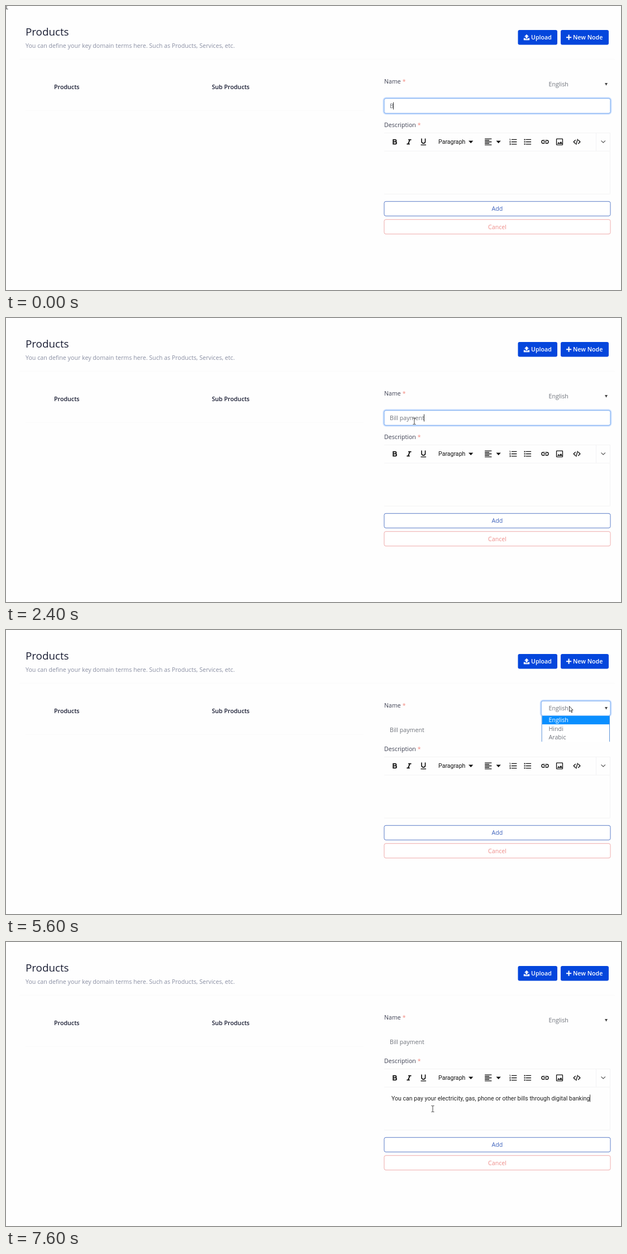
An HTML page that plays this animation: 1101x509 px, repeating every 8000 ms.

```html
<!DOCTYPE html>
<html lang="en">
<head>
<meta charset="utf-8">
<title>Products</title>
<style>
html, body { margin: 0; width: 100%; height: 100%; overflow: hidden; background: #fefefe; }
svg { display: block; width: 100%; height: 100%; }
text { font: 10.66px "Open Sans", sans-serif; fill: #3f4254; white-space: pre; }
.title { font-size: 18.8px; font-weight: 500; fill: #181c32; }
.sub { fill: #8a8fa3; }
.head { font-weight: 600; fill: #181c32; }
.btn { font-weight: 600; fill: #fff; }
.mid { text-anchor: middle; }
.star { fill: #f28b82; }
.field { fill: #6f737b; }
.rte { font: 10.6px Roboto, sans-serif; fill: #222; }
.tip { font-size: 8.5px; fill: #fff; text-anchor: middle; }
.faint { stroke: #f3f3f4; fill: none; }
.ring { fill: none; stroke: #cfe2ff; stroke-width: 4; }
.focus { fill: #fff; stroke: #6fa4ee; }
.ico { fill: none; stroke: #111; stroke-width: 2; }
.ico .fill { fill: #111; stroke: none; }
</style>
</head>
<body>
<svg viewBox="0 0 1101 509">
  <rect width="1101" height="509" fill="#fefefe"/>
  <path class="faint" d="M24 95.5H1090M35 187.5H640" style="stroke:#fafafa"/>

  <text class="title" x="35" y="52.5">Products</text>
  <text class="sub" x="35" y="74.7">You can define your key domain terms here. Such as Products, Services, etc.</text>
  <g fill="#0446dc">
    <rect x="916.5" y="43" width="70.5" height="26.5" rx="3"/>
    <rect x="993" y="43" width="86" height="26.5" rx="3"/>
  </g>
  <path fill="#fff" d="M932 50.8l4 4.2h-2.5v3.3h-3V55H928zM926.8 57.5h2.8v1.7h4.8v-1.7h2.8v3.7h-10.4z"/>
  <path stroke="#fff" stroke-width="2.1" d="M1003 56.2h9.2M1007.6 51.6v9.2"/>
  <text class="btn" x="940" y="60">Upload</text>
  <text class="btn" x="1015" y="60">New Node</text>

  <text class="head" x="86" y="148.5">Products</text>
  <text class="head" x="368.5" y="148.5">Sub Products</text>

  <text x="677" y="139.3">Name <tspan class="star">*</tspan></text>
  <text x="677" y="216.5">Description <tspan class="star">*</tspan></text>

  <g id="nameFocus">
    <rect class="ring" x="676.5" y="165.2" width="406" height="27.6" rx="4"/>
    <rect class="focus" x="677" y="165.7" width="405" height="26.6" rx="3"/>
  </g>
  <text class="field" id="name" x="687" y="183.4"></text>

  <g id="langFocus">
    <rect class="ring" x="957.7" y="126.7" width="124.8" height="27.2" rx="4"/>
    <rect class="focus" x="958.2" y="127.2" width="123.8" height="26.2" rx="3"/>
  </g>
  <text class="field" x="971.5" y="144.4">English</text>
  <path fill="#444" d="M1072 138h5l-2.500 4.800z"/>

  <path class="faint" d="M677 227.500H1081.500V337H677M677 260H1081M1056.500 228V260"/>
  <g id="tools"></g>
  <text class="rte" x="774" y="246.700" style="fill:#111">Paragraph</text>
  <path fill="#111" d="M828 241.500h8.400l-4.200 4.400zM877.500 241.500h8.400l-4.200 4.400z"/>
  <path fill="none" stroke="#555" stroke-width="1.200" d="M1065.500 241.300l3.700 3.700 3.700-3.700"/>
  <text class="rte" id="desc" x="690" y="283.800"></text>

  <rect x="677" y="350.300" width="405" height="26" rx="3" fill="#fff" stroke="#5a7cc8"/>
  <text class="mid" x="879.500" y="367" style="fill:#3f63bd">Add</text>
  <rect x="677" y="382.700" width="405" height="26" rx="3" fill="#fff" stroke="#eeaaaa"/>
  <text class="mid" x="879.500" y="399.800" style="fill:#ee8c88">Cancel</text>

  <g id="list">
    <rect x="959" y="153.500" width="122" height="46.700" fill="#fff"/>
    <path stroke="#5d93d8" d="M959.200 153.500V200.200M1080.500 153.500V200.200"/>
    <rect x="960" y="153.800" width="120.200" height="15.300" fill="#0a8fff"/>
    <text x="971.500" y="165.300" style="fill:#fff">English</text>
    <text class="field" x="971.500" y="180.600">Hindi</text>
    <text class="field" x="971.500" y="195.900">Arabic</text>
  </g>

  <g id="tip">
    <path fill="#29364b" d="M903 132H934L961 144Z"/>
    <rect x="843" y="100.500" width="107" height="33.300" rx="5.500" fill="#29364b"/>
    <text class="tip" x="896.500" y="120.500">Select language</text>
  </g>

  <path id="caret" stroke="#333" d="M0 0V13"/>
  <path id="beam" fill="none" stroke="#444" d="M-2.500 -5.500H-.8L0 -4.800L.8 -5.500H2.500M0 -5V5M-2.500 5.500H-.8L0 4.800L.8 5.500H2.500"/>
  <path id="arrow" fill="#fff" stroke="#222" stroke-width=".9" d="M0 0V9.500L2.200 7.500L3.800 11.200L5.300 10.500L3.700 7H6.600Z"/>
</svg>
<script>
const $ = id => document.getElementById(id);
const LOOP = 8000, STEP = 200;

// Toolbar icons on a 24-unit grid, placed by their centre
const tools = [
  [695.7, '<path stroke-width="2.700" d="M8.400 5.300h5a2.700 2.700 0 0 1 0 5.500h-5h5.600a2.950 2.950 0 0 1 0 5.900h-5.600z"/>', 1],
  [721.5, '<path stroke-width="2.700" d="M10 5.400h8M6 16.600h8M14.200 5.400l-4.500 11.200"/>', 1],
  [747.3, '<path stroke-width="2.400" d="M7.200 3v8a4.800 4.800 0 0 0 9.600 0V3"/><path d="M5 20h14"/>'],
  [863.3, '<path d="M3 4h18M3 8h12M3 12h18M3 16h12M3 20h18"/>'],
  [908.3, '<path d="M7 6h14M7 12h14M7 18h14"/><path stroke-width="1.200" d="M2 4.500h1.500V8M2 10.500h2.500L2.300 13.500H5M2 16.500h2.500v3H2M3 18h1.500"/>'],
  [934, '<path d="M7 6h14M7 12h14M7 18h14"/><path stroke-width="3" d="M2.500 6h3M2.500 12h3M2.500 18h3"/>'],
  [965, '<path d="M11 8H7a4 4 0 0 0 0 8h4M13 8h4a4 4 0 0 1 0 8h-4M8 12h8"/>'],
  [991, '<rect x="4" y="4" width="16" height="16" rx="1"/><path class="fill" d="M6 17l3.500-4.500 2.500 3 3.500-4.500 4 6z"/>'],
  [1022, '<path d="M8.700 6.700L3.400 12l5.300 5.300M15.300 6.700l5.300 5.300-5.300 5.300M14 4.500l-4 15"/>']
];
$('tools').innerHTML = tools.map(([x, body, dy = 0]) =>
  `<g class="ico" transform="translate(${x} 243.500) scale(.68) translate(-12 ${dy - 12})">${body}</g>`).join('');

const pointer = [
  [0, 1, 0], [200, 90, 20], [1200, 714, 203], [1400, 714, 203], [1600, 718, 206],
  [1800, 718, 206], [2000, 731, 185], [2800, 731, 185], [3400, 850.5, 149],
  [4000, 1012, 148], [4400, 1015, 145.5], [4800, 1008.5, 135.5],
  [5800, 1008.5, 137], [6000, 1000, 160], [6400, 764, 299]
];
const nameTyped = [[0, 1], [1600, 4], [2000, 7], [2200, 10], [2400, 12]];
const descTyped = [[0, 0], [6600, 8], [7000, 35], [7400, 61], [7600, 79]];
const NAME = 'Bill payment';
const DESC = 'You can pay your electricity, gas, phone or other bills through digital banking';

const last = (keys, t) => keys.filter(k => k[0] <= t).pop();
const within = (t, a, b) => t >= a && t < b;
const show = (id, on) => $(id).setAttribute('visibility', on ? 'visible' : 'hidden');
const move = (id, x, y) => $(id).setAttribute('transform', `translate(${x} ${y})`);

function pointAt(t) {
  const a = last(pointer, t);
  const b = pointer[pointer.indexOf(a) + 1] || a;
  const k = a === b ? 0 : (t - a[0]) / (b[0] - a[0]);
  return [a[1] + (b[1] - a[1]) * k, a[2] + (b[2] - a[2]) * k];
}

function draw(time) {
  const t = Math.floor((time % LOOP) / STEP) * STEP;
  $('name').textContent = NAME.slice(0, last(nameTyped, t)[1]);
  $('desc').textContent = DESC.slice(0, last(descTyped, t)[1]);

  show('nameFocus', t < 5600);
  show('langFocus', within(t, 5600, 6600));
  show('list', within(t, 5600, 6000));
  show('tip', within(t, 3000, 4200));

  const editing = t >= 6400;
  const box = $(editing ? 'desc' : 'name');
  const x = (editing ? 690 : 687) + box.getComputedTextLength();
  move('caret', Math.floor(x) + .5, editing ? 273.5 : 172.5);
  show('caret', t < 4200 || editing);

  const onSelect = within(t, 3800, 6200);
  const p = pointAt(t);
  move('beam', ...p);
  move('arrow', ...p);
  show('beam', !onSelect);
  show('arrow', onSelect);
}

const start = performance.now();
function tick() {
  draw(performance.now() - start);
  requestAnimationFrame(tick);
}
tick();
</script>
</body>
</html>
```
